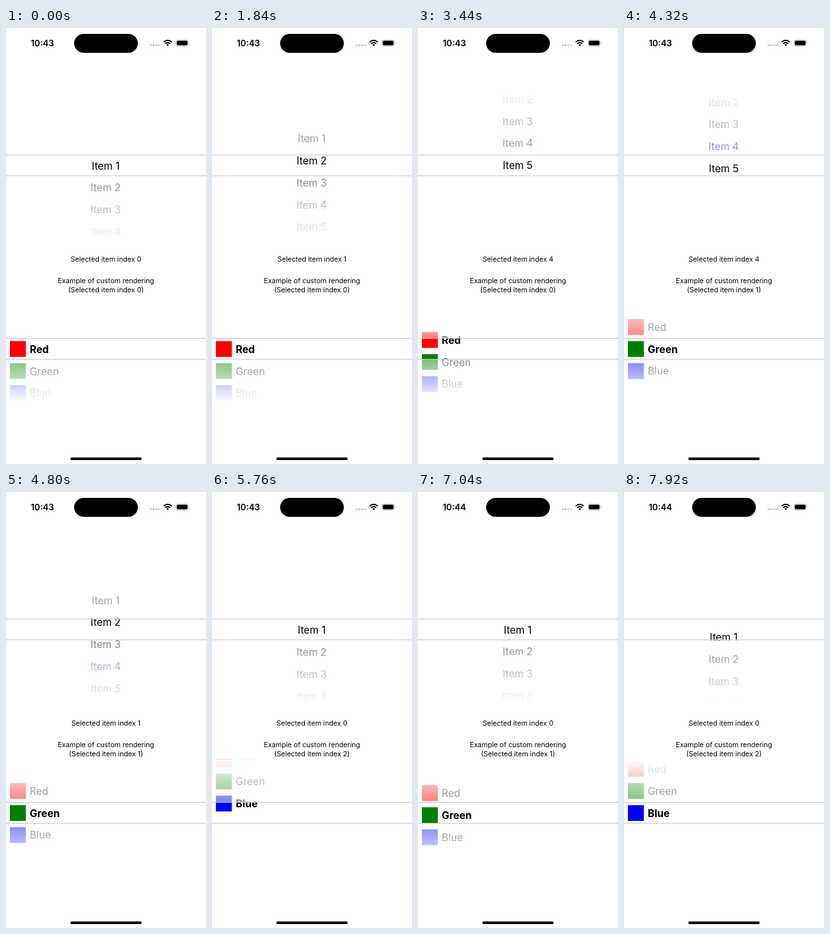
Recreate the animation shown at these times as an HTML page. Size 308 by 668 pixels, loop 8000 ms.

```html
<!DOCTYPE html>
<html lang="en">
<head>
<meta charset="utf-8">
<title>Wheel pickers</title>
<style>
  html, body { margin: 0; width: 100%; height: 100%; overflow: hidden; background: #fff; }
  svg { display: block; width: 100vw; height: 100vh; font-family: Inter, Roboto, sans-serif; }
  .item { font-size: 15.7px; }
  .label { font-size: 10.7px; text-anchor: middle; }
  .clock { font-size: 13.2px; font-weight: 600; text-anchor: middle; }
</style>
</head>
<body>
<svg id="stage" viewBox="0 0 308 668">
  <defs>
    <linearGradient id="fadeUp" x1="0" y1="1" x2="0" y2="0">
      <stop offset="0" stop-color="#fff" stop-opacity=".5"/><stop offset="1" stop-color="#fff"/>
    </linearGradient>
    <linearGradient id="fadeDown" x1="0" y1="0" x2="0" y2="1">
      <stop offset="0" stop-color="#fff" stop-opacity=".5"/><stop offset="1" stop-color="#fff"/>
    </linearGradient>
  </defs>
  <g id="pickers"></g>

  <text id="clock" class="clock" x="56" y="28"></text>
  <rect x="105" y="9" width="98" height="29" rx="14.5"/>
  <g fill="#c4c4c6">
    <circle cx="222.6" cy="26.3" r="1.6"/><circle cx="227" cy="26.3" r="1.6"/>
    <circle cx="231.4" cy="26.3" r="1.6"/><circle cx="235.8" cy="26.3" r="1.6"/>
  </g>
  <g fill="none" stroke="#000" stroke-width="1.9">
    <path d="M242.8 21.6a8.7 8.7 0 0 1 12.4 0M245 24.2a5.6 5.6 0 0 1 8 0"/>
    <path d="M247 25.7a2.9 2.9 0 0 1 4 0L249 27.8z" fill="#000" stroke="none"/>
  </g>
  <rect x="261.8" y="18.4" width="19" height="9.2" rx="3" fill="none" stroke="#a5a5a5" stroke-width=".8"/>
  <rect x="263" y="19.6" width="16.6" height="6.8" rx="2"/>
  <path d="M282 21.4q1.6 1.6 0 3.2z" fill="#a5a5a5"/>

  <text id="plainLabel" class="label" x="154" y="358.3"></text>
  <text class="label" x="154" y="391.3">Example of custom rendering</text>
  <text id="customLabel" class="label" x="154" y="404.6"></text>
  <rect x="99" y="658" width="110" height="4" rx="2"/>
</svg>
<script>
const LOOP = 8000, STEP = 80, PITCH = 33.8, BAND = 32;
const $ = id => document.getElementById(id);

function add(parent, tag, attrs, text = '') {
  const node = document.createElementNS('http://www.w3.org/2000/svg', tag);
  for (const name in attrs) node.setAttribute(name, attrs[name]);
  node.textContent = text;
  return parent.appendChild(node);
}

// A wheel: rows scroll under white fades above and below the selection band.
function makePicker(center, fade, drawRows) {
  const root = add($('pickers'), 'g', {});
  const wheel = add(root, 'g', {});
  const rows = drawRows(wheel);
  const top = center - BAND / 2, bottom = center + BAND / 2;
  const cover = (y, height, fill) => add(root, 'rect', { x: 0, y, width: 308, height, fill });
  cover(top - fade, fade, 'url(#fadeUp)');
  cover(bottom, fade, 'url(#fadeDown)');
  cover(top - fade - 90, 90.2, '#fff');
  cover(bottom + fade - .2, 90, '#fff');
  for (const y of [top, bottom]) cover(y - .5, 1, '#c8c8c8');
  return scroll => {
    wheel.setAttribute('transform', `translate(0 ${center - scroll * PITCH})`);
    const index = Math.max(0, Math.min(rows.length - 1, Math.round(scroll)));
    return { rows, index };
  };
}

const plainPicker = makePicker(210.5, 104, wheel =>
  [1, 2, 3, 4, 5].map((n, i) => add(wheel, 'text', {
    class: 'item', x: 153.5, y: i * PITCH + 6, 'text-anchor': 'middle', fill: n === 4 ? '#0d00c0' : '#000'
  }, 'Item ' + n)));

const customPicker = makePicker(491.5, 66, wheel =>
  ['Red', 'Green', 'Blue'].map((name, i) => {
    add(wheel, 'rect', { x: 6, y: i * PITCH - 11.8, width: 24.6, height: 24.2, fill: name.toLowerCase() });
    return add(wheel, 'text', { class: 'item', x: 36.6, y: i * PITCH + 6.2 }, name);
  }));

// [time, scroll position in rows]
const plainKeys = [[0, 0], [1839, 0], [1840, 1.22], [2160, 3.2], [2440, 4.25], [2720, 4.08], [3040, 4.01],
  [4240, 4], [4480, 3.2], [4800, 1.33], [5120, .45], [5400, -.15], [5760, -.02], [5920, 0],
  [7760, 0], [7920, -.34], [8000, -.45]];
const customKeys = [[0, 0], [3160, 0], [3440, .41], [3600, .8], [3840, 1], [5200, 1], [5440, 1.7],
  [5700, 2.44], [5760, 2.43], [6040, 2], [6160, 2], [6400, 1.2], [6720, 0], [6800, 0],
  [7040, .9], [7280, 1.9], [7440, 2.15], [7720, 2], [8000, 2]];

// Cubic through the keys, flat at turning points.
function valueAt(keys, t) {
  const slope = i => {
    const a = rate(i - 1), b = rate(i);
    return a * b > 0 ? 2 * a * b / (a + b) : 0;
  };
  const rate = i => keys[i] && keys[i + 1]
    ? (keys[i + 1][1] - keys[i][1]) / (keys[i + 1][0] - keys[i][0]) : 0;
  const i = Math.max(0, keys.findIndex(k => k[0] > t) - 1);
  const [t0, v0] = keys[i], [t1, v1] = keys[i + 1];
  const span = t1 - t0, u = (t - t0) / span, w = 1 - u;
  return v0 * w * w * (1 + 2 * u) + v1 * u * u * (1 + 2 * w)
    + span * u * w * (slope(i) * w - slope(i + 1) * u);
}

function render(t) {
  const plain = plainPicker(valueAt(plainKeys, t));
  const custom = customPicker(valueAt(customKeys, t));
  custom.rows.forEach((row, i) => row.setAttribute('font-weight', i === custom.index ? 700 : 400));
  $('plainLabel').textContent = `Selected item index ${plain.index}`;
  $('customLabel').textContent = `(Selected item index ${custom.index})`;
  $('clock').textContent = t < 6480 ? '10:43' : '10:44';
}

const start = performance.now();
function tick() {
  const t = (performance.now() - start) % LOOP;
  render(Math.floor(t / STEP) * STEP);
  requestAnimationFrame(tick);
}
tick();
</script>
</body>
</html>
```
